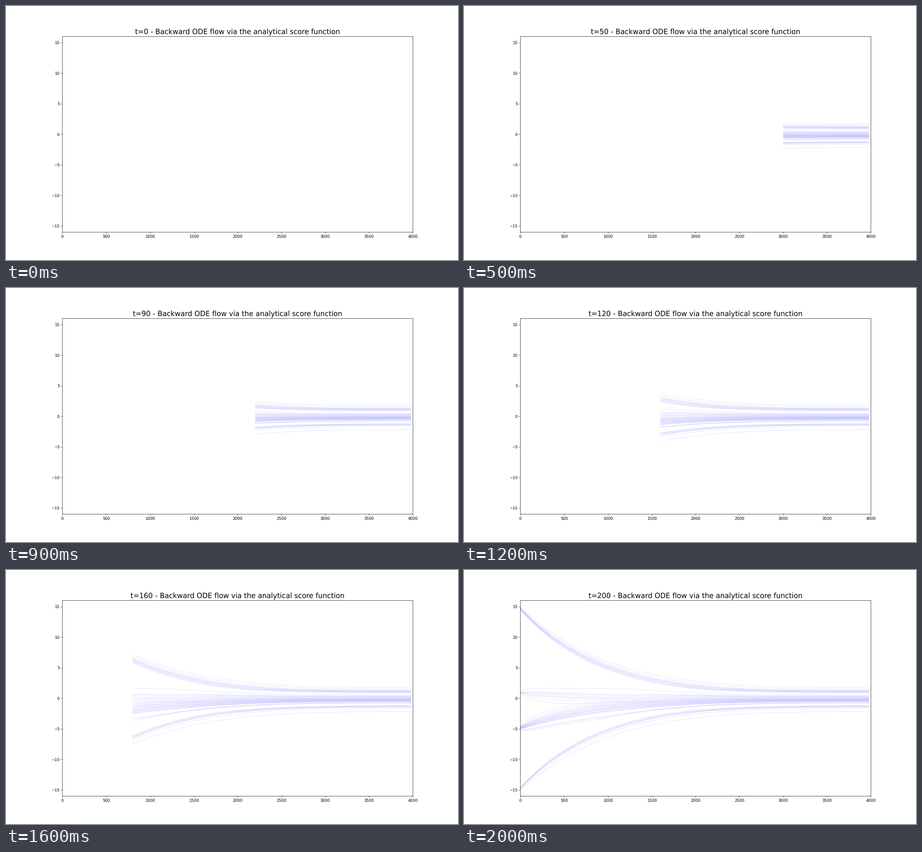
These frames come from a looping animation (998 by 561 pixels, 2.05 s). A matplotlib script:

```python
import numpy as np
import matplotlib.pyplot as plt
from matplotlib.animation import FuncAnimation
from matplotlib.collections import LineCollection

plt.rcParams["text.hinting"] = "none"

DPI = 62.375
T, DT, TAU = 4000, 20, 930.0
STEPS = T // DT
STRIDE = 5

MODES = np.array([15.0, 1.0, -5.0, -15.0])
WEIGHTS = np.array([0.25, 0.25, 0.3, 0.2])
SIGMA = 0.9


def score(x, t):
    """Score of the mixture of point masses after diffusing for time t."""
    a = np.exp(-t / TAU)
    var = SIGMA**2 * (1 - a * a)
    diff = a * MODES - x[:, None]
    logp = np.log(WEIGHTS) - diff**2 / (2 * var)
    r = np.exp(logp - logp.max(axis=1, keepdims=True))
    r /= r.sum(axis=1, keepdims=True)
    return (r * diff).sum(axis=1) / var


def start_points():
    rng = np.random.default_rng(4)

    def spread(lo, hi, n):
        gap = (hi - lo) / (n - 1)
        return np.linspace(lo, hi, n) + rng.uniform(-0.35, 0.35, n) * gap

    return np.concatenate([
        [1.75, 1.52, 0.56],
        spread(0.90, 1.31, 9),
        spread(0.06, 0.38, 7),
        spread(-0.56, 0.0, 18),
        spread(-0.76, -0.72, 3),
        spread(-1.44, -1.20, 6),
        [-1.63, -2.15],
    ])


def backward_flow():
    x = start_points()
    path = [x]
    for k in range(STEPS - 1):
        x = x + (x + SIGMA**2 * score(x, T - k * DT)) * DT / TAU
        path.append(x)
    return np.array(path)


paths = backward_flow()
times = T - DT * np.arange(1, STEPS + 1)

fig = plt.figure(figsize=(998 / DPI, 561.001 / DPI), dpi=DPI)
ax = fig.add_axes([0.1247, 0.11, 0.7753, 0.77])
ax.set_xlim(0, T)
ax.set_ylim(-16, 16)
title = ax.set_title("", fontsize=18)
lines = LineCollection([], colors="blue", alpha=0.1, linewidths=1.1)
ax.add_collection(lines, autolim=False)


def update(i):
    k = i * STRIDE
    lines.set_segments([np.column_stack([times[:k], p[:k]])
                        for p in paths.T] if k else [])
    title.set_text(f"t={k} - Backward ODE flow via the analytical score function")
    return lines, title


anim = FuncAnimation(fig, update, frames=STEPS // STRIDE + 1, interval=50,
                     repeat=True, repeat_delay=0)
plt.show()
```
